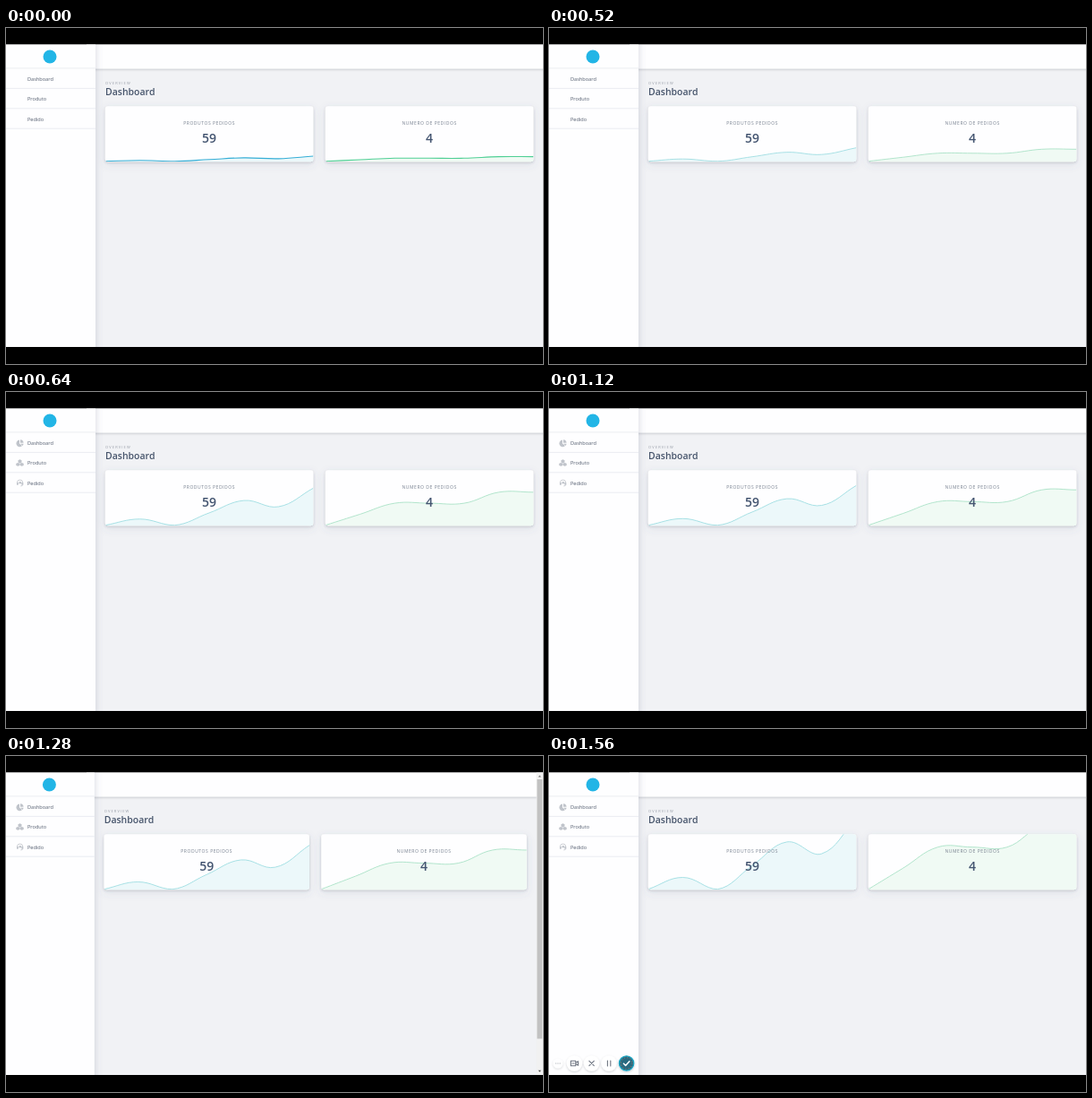
An HTML page for the animation above (3 s loop, 600 by 375 pixels).

```html
<!DOCTYPE html>
<html lang="pt">
<head>
<meta charset="utf-8">
<title>Dashboard</title>
<style>
  html, body { margin: 0; width: 100%; height: 100%; overflow: hidden; background: #000; }
  svg { display: block; width: 100vw; height: 100vh; font-family: "Open Sans", "Noto Sans", sans-serif; }
  .panel { fill: #fefeff; }
  .nav { font-size: 5.6px; fill: #515b6c; }
  .overview { font-size: 4px; letter-spacing: 1.15px; fill: #959ba6; }
  .title { font-size: 10.5px; font-weight: 600; fill: #46546b; }
  .label { font-size: 5px; letter-spacing: .55px; font-weight: 500; fill: #77808f; text-anchor: middle; }
  .value { font-size: 14px; font-weight: 600; fill: #435470; text-anchor: middle; }
  .rule { stroke: #e6e9ef; stroke-width: .8; }
  .icons { fill: #c0c4cb; }
  .line { fill: none; stroke-width: .8; }
  .tool { fill: #fff; filter: url(#soft); }
  .glyph { fill: none; stroke: #6f7682; stroke-width: 1.1; stroke-linecap: round; stroke-linejoin: round; }
</style>
</head>
<body>
<svg viewBox="0 0 600 375" preserveAspectRatio="none">
  <defs>
    <filter id="soft" x="-30%" y="-30%" width="160%" height="170%">
      <feDropShadow dx="0" dy="1" stdDeviation="1.2" flood-color="#5a6169" flood-opacity=".3"/>
    </filter>
    <filter id="lift" x="-10%" y="-20%" width="120%" height="160%">
      <feDropShadow dx="0" dy="1" stdDeviation="1" flood-color="#5a6169" flood-opacity=".28"/>
      <feDropShadow dx="0" dy="3" stdDeviation="5" flood-color="#5a6180" flood-opacity=".12"/>
    </filter>
    <filter id="edge" x="-20%" y="-10%" width="140%" height="120%">
      <feDropShadow dx="1" dy="0" stdDeviation="3.5" flood-color="#5a6180" flood-opacity=".22"/>
    </filter>
    <clipPath id="page"><rect y="18.5" width="600" height="337.5"/></clipPath>
  </defs>
  <rect width="600" height="375"/>
  <g clip-path="url(#page)">
    <rect y="18" width="600" height="339" fill="#f1f2f5"/>
    <rect class="panel" x="90" y="10" width="520" height="35.5" filter="url(#soft)"/>
    <g id="head">
      <text class="overview" x="111" y="63.4">OVERVIEW</text>
      <text class="title" x="111" y="75.3">Dashboard</text>
    </g>
    <g id="cards"></g>
    <rect class="panel" id="side" y="0" width="100" height="375" filter="url(#edge)"/>
    <g id="rules">
      <path class="rule" d="M0 44.9H100M0 67.4H100M0 89.8H100M0 112.2H100"/>
    </g>
    <circle id="mark" cx="49" cy="32" r="7.5" fill="#22b5e6"/>
    <g class="nav">
      <text x="24" y="58.9">Dashboard</text>
      <text x="24" y="81.1">Produto</text>
      <text x="24" y="103.5">Pedido</text>
    </g>
    <g class="icons" id="icons">
      <path d="M15 53.6A3.8 3.8 0 1 0 18 60L15 57.4Z"/>
      <path d="M16 53.2A3.7 3.7 0 0 1 19.6 56.8H16Z"/>
      <path d="M16 57.8H19.6A3.7 3.7 0 0 1 18.5 60.1Z"/>
      <path d="M15.5 75.3l2 .9v2.3l-2 .9l-2-.9v-2.3zM13.3 78.9l2 .9v2.1l-2 .9l-2-.9v-2.1zM17.7 78.9l2 .9v2.1l-2 .9l-2-.9v-2.1z"/>
      <path d="M12.4 101.3a3.2 3.2 0 0 1 6.4 0v2.2q0 1.4-2.4 1.4" fill="none" stroke="#c0c4cb" stroke-width=".8"/>
      <rect x="12" y="101" width="1.8" height="2.8" rx=".6"/>
      <rect x="17.3" y="101" width="1.8" height="2.8" rx=".6"/>
      <circle cx="15.8" cy="101.3" r="1.3"/>
    </g>
    <g id="scroll">
      <rect x="592.6" y="18" width="8" height="339" fill="#f1f1f1"/>
      <rect x="593.4" y="26" width="5.8" height="289.5" fill="#c1c1c1"/>
      <path d="M594.7 23.6l1.6-2l1.6 2z" fill="#777"/>
      <path d="M594.7 350.8l1.6 2l1.6-2z" fill="#444"/>
    </g>
    <g id="tools">
      <g opacity=".75">
        <circle class="tool" cx="10" cy="343" r="5.6"/>
        <path class="glyph" d="M7.8 343h0M10 343h0M12.2 343h0" stroke-width=".9"/>
      </g>
      <circle class="tool" cx="28.4" cy="343" r="8.8"/>
      <path class="glyph" d="M24.4 340.3h5.4v5.4h-5.4zM29.8 342.4l2.8-1.6v4.4l-2.8-1.6M26 343h2.2"/>
      <circle class="tool" cx="47.6" cy="343" r="8.8"/>
      <path class="glyph" d="M44.9 340.3l5.4 5.4m0-5.4l-5.4 5.4"/>
      <circle class="tool" cx="67" cy="343" r="8.8"/>
      <path class="glyph" d="M65.4 340v6M68.8 340v6" stroke-width="1.4"/>
      <circle class="tool" cx="86.6" cy="343" r="9"/>
      <circle cx="86.6" cy="343" r="8.2" fill="#286a80" stroke="#20a9c6" stroke-width="1.3"/>
      <circle cx="86.6" cy="343" r="6.3" fill="none" stroke="#c98568" stroke-width=".8" stroke-dasharray="1 2.3"/>
      <path class="glyph" d="M83.4 343.3l2.2 2.2l4.3-4.8" style="stroke:#fff;stroke-width:1.5"/>
    </g>
  </g>
</svg>
<script>
const LOOP = 3000, TOP = 87.2, BASE = 148.7;
const $ = id => document.getElementById(id);

const cards = [
  { label: 'PRODUTOS PEDIDOS', value: 59, data: [1, 2, 1, 3, 5, 4, 7], unit: 13.2,
    wide: [110.8, 232.6], slim: [109.4, 229.6], first: '#35aed6', line: '#93dadf', fill: '#ecf8fa' },
  { label: 'NUMERO DE PEDIDOS', value: 4, data: [1, 2, 3, 3, 3, 4, 4], unit: 23.5,
    wide: [356.8, 232.6], slim: [352.2, 229.6], first: '#4fcf95', line: '#a0dfc1', fill: '#f0faf4' }
];

// Chart growth, held between steps: [time, share of full height]
const growth = [
  [0, .072], [520, .19], [560, .34], [600, .45], [640, .523],
  [1120, .56], [1160, .575], [1200, .59], [1240, .605], [1280, .62],
  [1320, .85], [1360, 1]
];

cards.forEach((c, i) => {
  $('cards').insertAdjacentHTML('beforeend', `
    <clipPath id="clip${i}"><rect y="${TOP}" height="62" rx="3.2"/></clipPath>
    <rect class="panel" y="${TOP}" height="62" rx="3.2" filter="url(#lift)"/>
    <g clip-path="url(#clip${i})"><path fill="${c.fill}"/><path class="line"/></g>
    <text class="label" y="107.9">${c.label}</text>
    <text class="value" y="128.2">${c.value}</text>`);
  const all = s => [...$('cards').querySelectorAll(s)];
  c.boxes = all('rect').slice(-2);
  [c.area, c.curve] = all('path').slice(-2);
  c.texts = all('text').slice(-2);
});

// Smooth curve with tension 0.4, handles kept above the base line
function spline(pts) {
  const n = pts.length;
  const handles = pts.map((p, i) => {
    const a = pts[Math.max(i - 1, 0)], b = pts[Math.min(i + 1, n - 1)];
    const da = Math.hypot(p[0] - a[0], p[1] - a[1]);
    const db = Math.hypot(b[0] - p[0], b[1] - p[1]);
    const at = k => [p[0] + k * (b[0] - a[0]), Math.min(BASE, p[1] + k * (b[1] - a[1]))];
    return [at(-.4 * da / (da + db)), at(.4 * db / (da + db))];
  });
  return 'M' + pts[0] + pts.slice(1).map((p, i) =>
    `C${handles[i][1]} ${handles[i + 1][0]} ${p}`).join('');
}

function drawCard(c, grow, slim) {
  const [x, w] = slim ? c.slim : c.wide;
  c.boxes.forEach(b => { b.setAttribute('x', x); b.setAttribute('width', w); });
  c.texts.forEach(t => t.setAttribute('x', x + w / 2));
  const pts = c.data.map((v, i) => [x + w * i / 6, BASE - (v - 1) * c.unit * grow]);
  const d = spline(pts);
  c.curve.setAttribute('d', d);
  c.curve.setAttribute('stroke', grow < .1 ? c.first : c.line);
  c.curve.style.strokeWidth = grow < .1 ? 1.1 : .8;
  c.area.setAttribute('d', `${d}V150H${x}Z`);
}

const show = (id, on) => $(id).style.display = on ? '' : 'none';

function draw(t) {
  const grow = growth.filter(g => g[0] <= t).pop()[1];
  const slim = t >= 1240 && t < 1520;
  cards.forEach(c => drawCard(c, grow, slim));
  $('head').setAttribute('transform', `translate(${slim ? -1.3 : 0})`);
  $('mark').setAttribute('cx', slim ? 48.4 : 49);
  $('side').setAttribute('width', slim ? 98.8 : 100);
  $('rules').setAttribute('transform', `scale(${slim ? .988 : 1} 1)`);
  show('scroll', slim);
  show('icons', t >= 560);
  show('tools', t >= 1440);
  const rise = Math.min(1, Math.max(0, (Math.floor(t / 40) * 40 - 1400) / 160));
  $('tools').setAttribute('opacity', rise);
  $('tools').setAttribute('transform', `translate(0 ${14 * (1 - rise) ** 2})`);
}

const start = performance.now();
function tick() {
  draw((performance.now() - start) % LOOP);
  requestAnimationFrame(tick);
}
tick();
</script>
</body>
</html>
```
